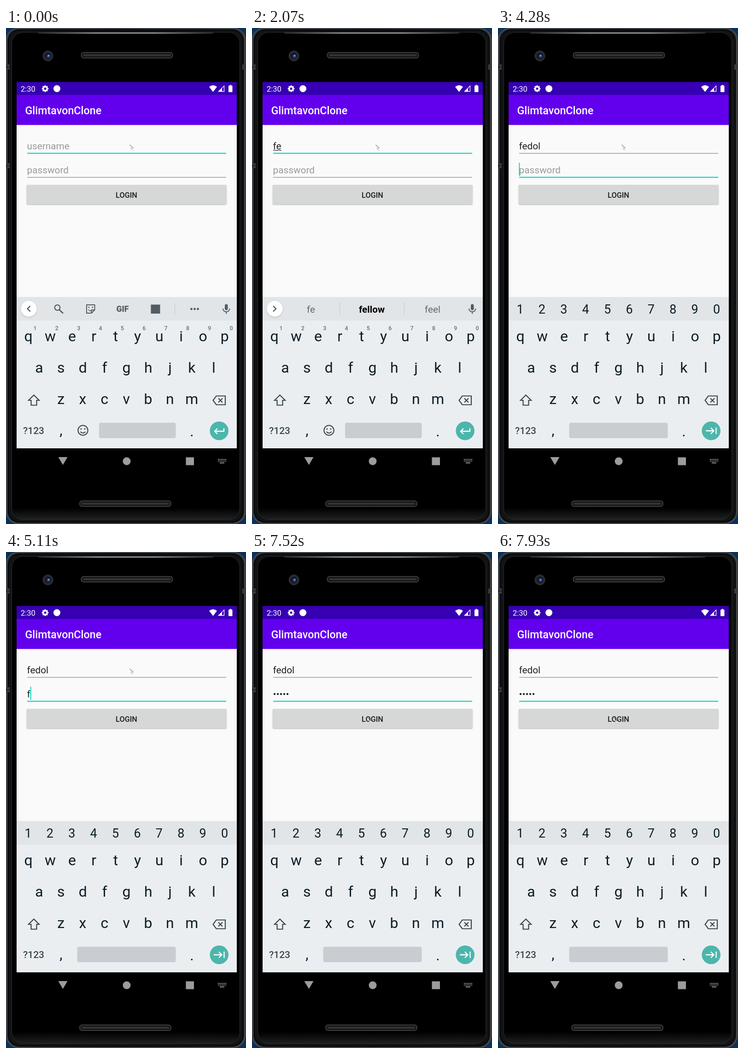
Recreate the animation shown at these times as an HTML page with a canvas. Size 521 px wide and 1075 px high, loop 8000 ms.

```html
<!DOCTYPE html>
<html lang="en">
<head>
<meta charset="utf-8">
<title>Login form</title>
<style>
html, body { margin: 0; width: 100%; height: 100%; overflow: hidden; background: #000; }
canvas { display: block; }
</style>
</head>
<body>
<canvas id="stage" width="521" height="1075"></canvas>
<script>
const c = document.getElementById('stage').getContext('2d');
const LOOP = 8000, TEAL = '#03dac5', ICON = '#535c62', KEY = '#0b1d27';
const USER = 'fedol';
const userKeys = [1370, 1660, 2940, 3100, 3370];
const passKeys = [5110, 5380, 5670, 5810, 6080];
const caretOn = [[410, 820], [1370, 2070], [2630, 3820], [4140, 4410], [4990, 6640], [7200, 7520]];
const hints = [[], ['f', 'for', 'from'], ['fe', 'fellow', 'feel'], ['fed', 'federal', 'feed'],
  ['fedo', 'Fedol', 'feed'], ['fedol', 'Fedol', '']];

const count = (times, t) => times.filter(x => t >= x).length;

function text(s, x, y, size, color, weight = 400, align = 'left') {
  c.font = `${weight} ${size}px Roboto, sans-serif`;
  c.textAlign = align;
  c.fillStyle = color;
  c.fillText(s, x, y);
  return c.measureText(s).width;
}
function rect(x, y, w, h, color) {
  c.fillStyle = color;
  c.fillRect(x, y, w, h);
}
function round(x, y, w, h, r, fill, stroke, lw = 1) {
  c.beginPath();
  c.roundRect(x, y, w, h, r);
  if (fill) { c.fillStyle = fill; c.fill(); }
  if (stroke) { c.strokeStyle = stroke; c.lineWidth = lw; c.stroke(); }
}
const disc = (x, y, r, fill, stroke, lw) => round(x - r, y - r, 2 * r, 2 * r, r, fill, stroke, lw);
function line(d, color, lw = 2) {
  c.strokeStyle = color;
  c.lineWidth = lw;
  c.stroke(new Path2D(d));
}
function shape(d, color) {
  c.fillStyle = color;
  c.fill(new Path2D(d));
}
function ramp(x0, y0, x1, y1, ...colors) {
  const g = c.createLinearGradient(x0, y0, x1, y1);
  colors.forEach((k, i) => g.addColorStop(i / (colors.length - 1), k));
  return g;
}
function shadow(color, blur, dy) {
  c.shadowColor = color;
  c.shadowBlur = blur;
  c.shadowOffsetY = dy;
}
const noShadow = () => shadow('transparent', 0, 0);

function speaker(x, y) {
  round(x, y, 198, 12, 5, '#171717', '#4b4b4b', 1.5);
  round(x + 4, y + 4, 190, 4, 2, '#343434');
}

function drawPhone() {
  rect(0, 0, 521, 1075, '#0b3157');
  round(1, 1, 518, 1073, [24, 24, 26, 26], ramp(0, 0, 521, 0, '#303234', '#141516', '#303234'), '#55575a', 1.5);
  round(5, 4, 510, 1067, 24, '#121314', '#050505', 2);
  round(12.5, 9.5, 495, 1056, 24, ramp(0, 1040, 0, 1066, '#000', '#202122'), '#2b2d2f', 1);
  rect(70, 10, 380, 2, ramp(70, 0, 450, 0, '#2b2d2f', '#b5b5b5', '#b5b5b5', '#2b2d2f'));
  for (const y of [79, 293]) {
    rect(0, y, 8, 11, '#393b3d');
    rect(0, y + 5, 8, 1, '#0c0c0c');
  }
  rect(513, 79, 8, 11, '#393b3d');
  speaker(163.5, 53);
  speaker(160, 1025);
  disc(91, 60.5, 11, '#292929', '#3a3a3a', 1);
  disc(91, 60.5, 7, '#10162c');
  disc(92, 61, 4, '#263b83');
  disc(92.5, 60, 1.5, '#9bb4ec');

  shape('M113.5 930H133.5L123.5 947Z', '#9c9c9c');
  disc(262, 939, 8.5, '#9c9c9c');
  rect(390.5, 930.5, 17.5, 17, '#9c9c9c');
  for (let i = 0; i < 6; i++)
    for (let j = 0; j < 2; j++) rect(460 + i * 3.2, 934 + j * 3.5, 2, 2, '#9c9c9c');
  rect(464, 941.5, 10, 2, '#9c9c9c');
}

function drawBars() {
  rect(23, 117, 478, 466, '#fafafa');
  rect(23, 210, 478, 3, ramp(0, 210, 0, 213, '#d8d8dc', '#fafafa'));
  rect(23, 145, 478, 65, '#6200ee');
  rect(23, 117, 478, 28, '#3700b3');
  text('2:30', 32, 138, 16.5, '#fff');
  disc(85, 131.5, 4.2, null, '#fff', 3.4);
  for (let i = 0; i < 8; i++) {
    const a = i * Math.PI / 4, p = r => `${85 + r * Math.cos(a)} ${131.5 + r * Math.sin(a)}`;
    line(`M${p(5)}L${p(7.2)}`, '#fff', 3);
  }
  disc(110.5, 131.5, 7.5, '#fff');
  shape('M441 127.5Q449.500 120.500 458 127.5L449.500 138.5Z', '#fff');
  line('M461.500 137.500H473.500V125.500Z', '#fff', 1.3);
  shape('M460.500 138L469 129.500V138Z', '#fff');
  round(483, 125, 8.5, 14, 1.2, '#fff');
  rect(485.3, 123.5, 4, 2, '#fff');
  text('GlimtavonClone', 41.5, 187, 23.3, '#fff', 500);
}

function fieldLine(y, focused) {
  if (focused) rect(46, y - 0.5, 432, 2.2, TEAL);
  else rect(46, y, 432, 1.2, '#868686');
}

function drawForm(t) {
  const onPass = t >= 4140;
  const typed = USER.slice(0, count(userKeys, t)), n = count(passKeys, t);
  fieldLine(271, !onPass);
  fieldLine(323, onPass);

  let userEnd = 0, passEnd = 0;
  if (typed) {
    userEnd = text(typed, 45.5, 262.5, 20.8, '#212121');
    if (!onPass) rect(46, 264.5, userEnd, 1.2, '#212121');
  } else text('username', 45.5, 262.5, 20.8, '#9b9b9b');

  if (n) {
    const shown = t < 7200 ? USER[n - 1] : '•';
    passEnd = text('•'.repeat(n - 1) + shown, 45.5, 314.5, 20.8, '#212121');
  } else text('password', 45.5, 314.5, 20.8, '#9b9b9b');

  if (caretOn.some(([a, b]) => t >= a && t < b))
    rect(45.5 + (onPass ? passEnd : userEnd), onPass ? 292 : 240, 2, 28.5, TEAL);

  const pressed = t >= 7660 && t < 7930;
  shadow('rgba(0,0,0,.3)', pressed ? 4 : 2.5, 1);
  round(45, 340, 433.5, 42, 2, pressed ? '#cbcccc' : '#d6d7d7');
  noShadow();
  text('LOGIN', 261.5, 367.5, 16.3, '#1c1c1c', 500, 'center');
}

function mic() {
  round(475, 598.5, 6.5, 13, 3.2, ICON);
  line('M471 608Q471.500 615 478.200 615T485.500 608M478.200 615V619.500', ICON, 2);
}

function chevron(d) {
  shadow('rgba(0,0,0,.22)', 3, 1);
  disc(49.5, 608.5, 17.3, '#fff');
  noShadow();
  line(d, '#3c4448', 2);
}

function drawStrip(t) {
  const n = count(userKeys, t);
  rect(23, 583, 478, 51.5, '#e1e5e8');
  if (t >= 4280) {
    [...'1234567890'].forEach((k, i) => text(k, 48 + i * 47.4, 619, 27, KEY, 400, 'center'));
    return;
  }
  mic();
  if (n) {
    chevron('M46 602.500L52 608.500L46 614.500');
    const [left, mid, right] = hints[n];
    text(left, 128, 616.5, 20.7, '#636b70', 400, 'center');
    text(mid, 260, 616.5, 20.7, '#000', 700, 'center');
    text(right, 392, 616.5, 20.7, '#636b70', 400, 'center');
    rect(190, 595, 1, 27, '#c3c8cb');
    rect(330, 595, 1, 27, '#c3c8cb');
    return;
  }
  chevron('M52.500 602.500L46.500 608.500L52.500 614.500');
  disc(111.5, 606, 5.8, null, ICON, 2.2);
  line('M116 611L124 618.500', ICON, 2.7);
  line('M175 600H192.500V611L185.500 618H175ZM192 611H185.500V618', ICON, 2);
  line('M179 610Q181 614 185 613', ICON, 1.6);
  rect(178.5, 604, 2.5, 2.5, ICON);
  rect(186.5, 604, 2.5, 2.5, ICON);
  text('GIF', 253, 615, 17.6, ICON, 900, 'center');
  rect(314.5, 599.5, 20, 19.5, ICON);
  rect(366, 596, 1, 26, '#c3c8cb');
  for (const x of [402.5, 409.5, 416.5]) disc(x, 609, 2.4, ICON);
}

function drawKeys(t) {
  const passMode = t >= 4280;
  rect(23, 634, 478, 277, '#ebeef1');
  const row = (keys, x, y) =>
    [...keys].forEach((k, i) => text(k, x + i * 47.35, y, 32, KEY, 400, 'center'));
  row('qwertyuiop', 48.7, 678.5);
  row('asdfghjkl', 72, 746.5);
  row('zxcvbnm', 119.2, 815);
  row(',', 119.5, 882);
  row('.', 403.5, 884.5);
  text('?123', 60, 880, 21, '#39464d', 500, 'center');
  line('M60.500 795.500L72 807H66.500V817.500H54.500V807H49Z', '#39464d', 2.2);
  line('M456.500 797.500H476V816.500H456.500L449.500 807ZM461 802.500L470 811.500M470 802.500L461 811.500', '#39464d', 2.2);
  if (!passMode) {
    [...'1234567890'].forEach((k, i) => text(k, 63 + i * 47.35, 655, 12.5, '#697177', 500, 'center'));
    disc(167, 872, 10.7, null, '#39464d', 2.1);
    disc(163, 869, 1.6, '#39464d');
    disc(171, 869, 1.6, '#39464d');
    line('M161.500 875Q167 881 172.500 875', '#39464d', 2);
  }
  const left = passMode ? 154.5 : 202;
  round(left, 855.5, 368.5 - left, 33.5, 4, '#c9cdd1');
  disc(462.7, 873, 20.3, '#4db6ac');
  line(passMode
    ? 'M451 873H468.500M462 866.500L468.500 873L462 879.500M473.500 866V880'
    : 'M473 867.500V874H453M459 868L453 874L459 880', '#fff', 2.3);
}

function drawPointer(t) {
  const k = Math.min(1, Math.max(0, Math.floor((t - 6780) / 140) / 4));
  c.save();
  c.translate(268.5 - 17 * k, 253 + 106 * k);
  shape('M2 5L8.500 8.500L6.500 12L4 10Z', '#f4f4f4');
  line('M0 0L8 7.500', '#333', 1);
  line('M2 7.500H4M4.500 8.500H6M3.500 10.500H4.500M6 11.500L7 12.500', '#777', 1);
  c.restore();
}

function frame(now) {
  const t = now % LOOP;
  drawPhone();
  drawBars();
  drawForm(t);
  drawStrip(t);
  drawKeys(t);
  drawPointer(t);
  requestAnimationFrame(frame);
}
requestAnimationFrame(frame);
</script>
</body>
</html>
```
